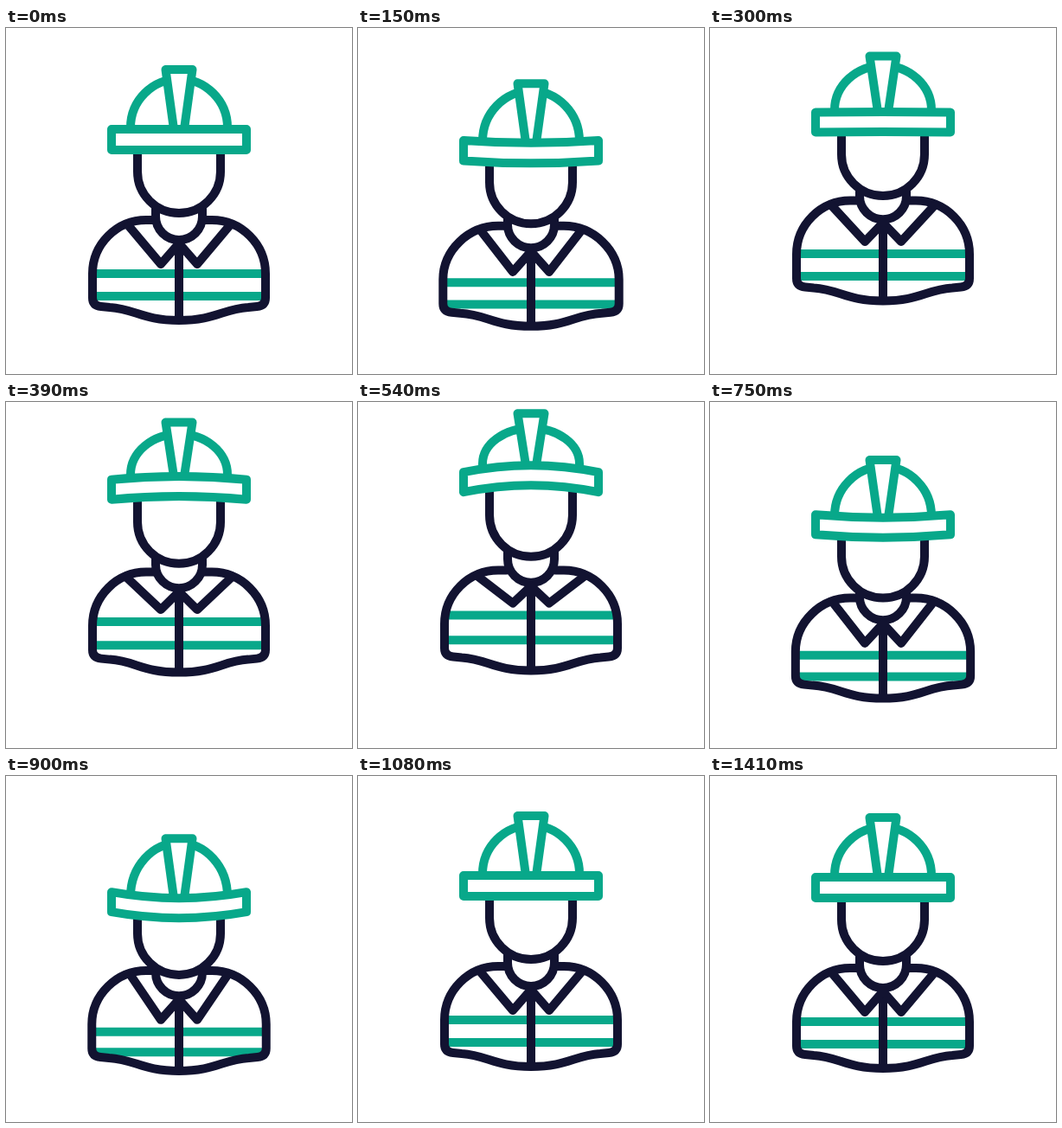
Write an HTML page that moves like this. It is 400 px wide and 400 px high and loops after 3440 ms.

```html
<!DOCTYPE html>
<html lang="en">
<head>
<meta charset="utf-8">
<title>Worker in a hard hat</title>
<style>
  html, body { margin: 0; width: 100%; height: 100%; overflow: hidden; background: #fff; }
  svg { display: block; width: 100%; height: 100%; }
  path { fill: none; stroke: #121331; stroke-width: 10; stroke-linecap: round; stroke-linejoin: round; }
  .green { stroke: #08a88a; }
  .flat { stroke-linecap: butt; }
  .solid { fill: #fff; }
</style>
</head>
<body>
<svg viewBox="0 0 400 400">
  <clipPath id="inside"><path id="torsoClip"/></clipPath>
  <path id="stripes" class="green flat" clip-path="url(#inside)"/>
  <path id="torso"/>
  <path id="neck" class="solid"/>
  <path id="placket" class="flat"/>
  <path id="collar"/>
  <path id="head" class="solid flat"/>
  <path id="dome" class="green flat"/>
  <path id="knob" class="green solid flat"/>
  <path id="brim" class="green solid"/>
</svg>
<script>
const LOOP = 3440, STEP = 30, END = 1410;

// crouch, leap, land, settle: [time, height]
const jump = [[0, 0], [120, 9], [300, -22.5], [540, -27.5], [660, -9],
              [810, 9], [900, 3], [1080, -2], [1230, 3], [END, 0]];
// loose parts swing after the body: [time, bend]
const swing = [[0, 0], [120, 3], [300, -0.5], [540, -8], [660, -0.5], [900, 7], [1080, 0], [END, 0]];

const draw = (id, d) => document.getElementById(id).setAttribute("d", d);

function smooth(from, to, t) {
  const u = Math.min(1, Math.max(0, (t - from) / (to - from)));
  return u * u * (3 - 2 * u);
}

// slope at a key: zero at turning points, harmonic mean elsewhere
function slope(keys, i) {
  if (i === 0 || i === keys.length - 1) return 0;
  const rate = j => (keys[j + 1][1] - keys[j][1]) / (keys[j + 1][0] - keys[j][0]);
  const a = rate(i - 1), b = rate(i);
  return a * b <= 0 ? 0 : 2 * a * b / (a + b);
}

function sample(keys, t) {
  let i = 0;
  while (i < keys.length - 2 && t >= keys[i + 1][0]) i++;
  const [t0, v0] = keys[i], [t1, v1] = keys[i + 1];
  const h = t1 - t0, u = (t - t0) / h, s = smooth(0, 1, u);
  return v0 + (v1 - v0) * s
       + h * u * (1 - u) * (slope(keys, i) * (1 - u) - slope(keys, i + 1) * u);
}

function torsoPath(y, wide) {
  const l = 100 - wide, r = 300 + wide;
  return `M172 ${222 + y}H162C128 ${222 + y} ${l} ${250 + y} ${l} ${284 + y}V${312 + y}
    Q${l} ${321 + y} ${l + 10} ${322 + y}L${l + 20} ${323 + y}
    C150 ${325 + y} 158 ${338 + y} 200 ${338 + y}S250 ${325 + y} ${r - 20} ${323 + y}
    L${r - 10} ${322 + y}Q${r} ${321 + y} ${r} ${312 + y}V${284 + y}
    C${r} ${250 + y} 272 ${222 + y} 238 ${222 + y}H228`;
}

function pose(t) {
  const y = sample(jump, t), bend = sample(swing, t);
  const air = smooth(0, 300, t) * (1 - smooth(900, 1080, t));
  // resting height, share of the swing, extra drop while moving
  const at = (rest, share, drop = 0) => rest + y + share * bend + drop * air;

  const body = torsoPath(y, Math.max(0, y) / 4);
  draw("torso", body);
  draw("torsoClip", body);
  draw("stripes", `M90 ${at(284, 1.25)}H310M90 ${at(310, 0.9)}H310`);

  const n = at(0, 1, -0.7);
  draw("neck", `M173 ${192 + n}V${218 + n}A27 27 0 0 0 227 ${218 + n}V${192 + n}`);
  draw("placket", `M200 ${246 + n}V${338 + y}`);
  const cx = 58 - bend * 0.45, cy = 229 + y, tip = at(273, 1.25, -2.9);
  draw("collar", `M${200 - cx} ${cy}L179 ${tip}L200 ${249 + n}L221 ${tip}L${200 + cx} ${cy}`);

  const h = at(0, 1.37, 3.3);
  draw("head", `M152 ${130 + h}V${166 + h}A48 48 0 0 0 248 ${166 + h}V${130 + h}`);

  const top = at(117, 1.5, 3.7), low = top + 24 - air, base = top + bend;
  draw("dome", `M144 ${base}V${base - 2}A56 ${base - 2 - at(59, 1.1, 7.5)} 0 0 1 256 ${base - 2}V${base}`);
  const peak = at(48, 1.9, 8);
  draw("knob", `M194 ${base}L184.5 ${peak}H215.5L206 ${base}`);
  draw("brim", `M122 ${top}Q200 ${top + 2 * bend} 278 ${top}V${low}Q200 ${low + 2 * bend} 122 ${low}Z`);
}

const start = performance.now();
function tick() {
  const t = (performance.now() - start) % LOOP;
  pose(Math.min(END, Math.floor(t / STEP) * STEP));
  requestAnimationFrame(tick);
}
tick();
</script>
</body>
</html>
```
